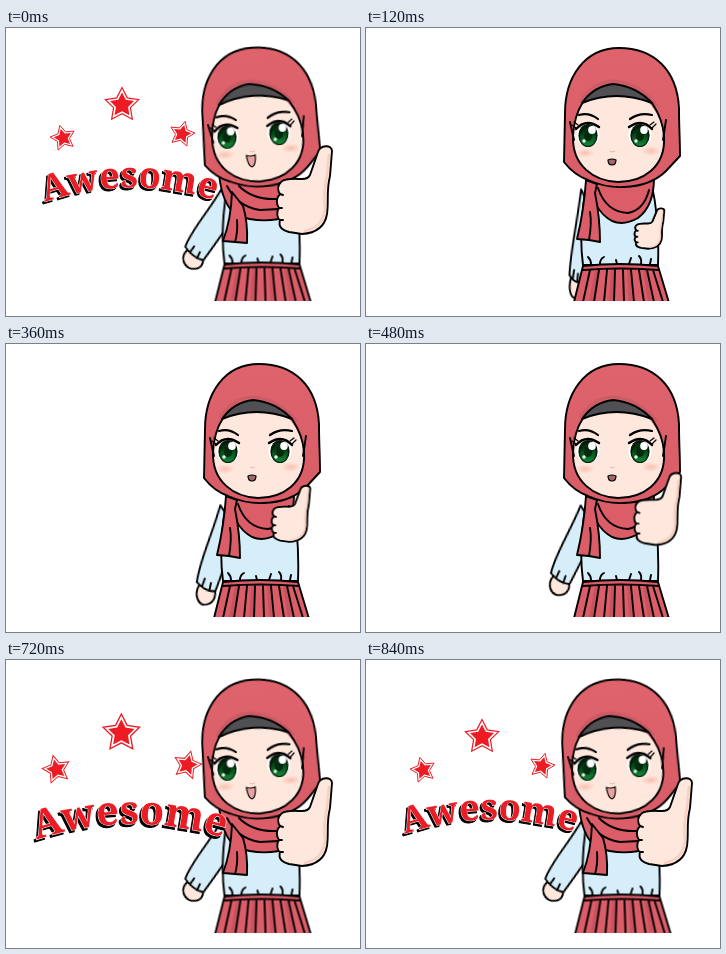
An HTML page that plays this animation: 354 px wide and 288 px high, repeating every 960 ms.

```html
<!DOCTYPE html>
<html lang="en">
<head>
<meta charset="utf-8">
<title>Awesome</title>
<style>
  html, body { margin: 0; width: 100%; height: 100%; overflow: hidden; background: #fff; }
  svg { display: block; width: 100vw; height: 100vh; }
  .ink { stroke: #000; stroke-width: 1.9; stroke-linejoin: round; stroke-linecap: round; vector-effect: non-scaling-stroke; }
  .line { fill: none; }
  .red { fill: #da5d68; }
  .skin { fill: #fee8de; }
  .blue { fill: #d6eef9; }
  .word { font: bold 36px "Noto Serif", serif; text-anchor: middle; }

  /* every pose is held for one eighth of the loop */
  .calm, .proud, .head, .body, .arm, .thumb, .cheer { animation: .96s step-end infinite; }
  .calm { animation-name: calm; }
  .proud { animation-name: proud; }
  .head { animation-name: head; transform-origin: 254px 90px; }
  .body { animation-name: body; }
  .arm { animation-name: arm; }
  .thumb { animation-name: thumb; }
  .cheer { animation-name: cheer; transform-origin: 122.5px 115px; }

  @keyframes calm { 0%, 62.5%, 100% { visibility: hidden } 12.5% { visibility: visible } }
  @keyframes proud { 0%, 62.5%, 100% { visibility: visible } 12.5% { visibility: hidden } }
  @keyframes head {
    0%, 62.5%, 100% { transform: translate(-2.3px, -.5px) rotate(-4deg) }
    12.5% { transform: none }
  }
  @keyframes body {
    0%, 62.5%, 100% { transform: translate(1.5px, -1.5px) }
    12.5% { transform: none }
  }
  @keyframes arm {
    0%, 62.5%, 100% { transform: translate(217px, 168px) rotate(25.5deg) scale(1.1, .84) }
    12.5% { transform: translate(217px, 168px) rotate(5deg) scale(.6, 1.08) }
    25% { transform: translate(217px, 168px) rotate(8.5deg) scale(.8, 1.04) }
    37.5% { transform: translate(217px, 168px) rotate(12deg) }
    50% { transform: translate(217px, 168px) rotate(18deg) scale(1.05, .92) }
  }
  @keyframes thumb {
    0%, 62.5%, 100% { transform: none }
    12.5% { transform: matrix(.54, 0, 0, .46, 122.2, 126) }
    25% { transform: matrix(.62, 0, 0, .55, 99, 96) }
    37.5% { transform: matrix(.7, 0, 0, .64, 76, 66) }
    50% { transform: matrix(.85, 0, 0, .82, 38, 32) }
  }
  @keyframes cheer {
    0%, 87.5%, 100% { transform: none }
    62.5% { transform: scale(.9) }
    75% { transform: scale(1.1) }
  }
</style>
</head>
<body>
<svg viewBox="0 0 354 288">
  <defs>
    <linearGradient id="hood" x2="0" y2="1">
      <stop offset="0" stop-color="#de636c"/><stop offset="1" stop-color="#d95d67"/>
    </linearGradient>
    <linearGradient id="iris" x2="0" y2="1">
      <stop offset=".2" stop-color="#04300f"/><stop offset="1" stop-color="#108a35"/>
    </linearGradient>
    <radialGradient id="blush">
      <stop offset="0" stop-color="#f9c0b0"/><stop offset="1" stop-color="#f9c0b0" stop-opacity="0"/>
    </radialGradient>
    <clipPath id="floor"><path d="M0 0H354V272.7H0Z"/></clipPath>
    <path id="arc" d="M36 175Q122 145 212 173"/>
    <path id="point" d="M0-100 30-41 95-31 48 15 59 81 0 50-59 81-48 15-95-31-30-41Z"/>
    <g id="star">
      <use href="#point" fill="#fff" stroke="#ed1c24" stroke-width="7"/>
      <use href="#point" fill="#ed1c24" transform="scale(.72)"/>
    </g>
    <g id="eye">
      <ellipse rx="11.5" ry="11.5" fill="#fff"/>
      <ellipse cy=".5" rx="9.6" ry="11.5" fill="#061c0b"/>
      <ellipse cy="2" rx="8" ry="9" fill="url(#iris)"/>
      <ellipse cy="1" rx="4" ry="5" fill="#032a0d"/>
      <ellipse cx="4" cy="-5" rx="3.8" ry="4" fill="#fff"/>
      <circle cx="-4" cy="6" r="1.7" fill="#e4f7e8"/>
    </g>
  </defs>

  <g clip-path="url(#floor)">
    <g class="arm">
      <path class="ink skin" d="M-8 76C-12 88-4 97 3 94 10 91 11 84 8 77Z"/>
      <path class="ink blue" d="M-4-6C-6 25-13 55-11 74Q0 82 9 79C12 60 14 40 18 15Z"/>
      <path class="ink line" d="M-5 77-4 69M3 80 3 72"/>
    </g>
    <g class="body">
      <path class="ink blue" d="M219 165C215 190 214 215 217 237H292C293 210 292 185 286 158Z"/>
      <path class="ink line" d="M225 236Q225 232 222 229M234 236Q234 231 238 229M251 236 250 232M263 236 265 230M275 236Q276 231 273 228M284 236 285 231"/>
      <path class="ink red" d="M217 238Q254 234 292 238L304 278H207Z"/>
      <path fill="#c9525f" d="M229 242 223 274H227L232 242ZM245 242 243 274H247L248 242ZM261 242 263 274H267L264 242ZM277 242 282 274H286L280 242Z"/>
      <path class="ink line" d="M217 242Q254 239 293 242M224 242 217 274M233 242 228 274M241 242 238 274M249 242 248 274M257 242 258 274M265 242 268 274M273 242 278 274M281 242 288 274M287 242 297 274"/>
    </g>
  </g>

  <g class="calm">
    <path class="ink red" d="M222 150Q226 182 246 193 258 198 272 190 288 178 288 150Z"/>
    <path class="ink line" d="M232 160Q240 184 262 185 278 182 283 162"/>
    <path class="ink red" d="M220 152Q218 182 211 211L223 212 234 214Q234 190 229 165L231 156Z"/>
    <path class="ink line" d="M223 212Q226 195 224 184"/>
  </g>
  <g class="proud">
    <path class="ink red" d="M213 146Q216 176 230 187 250 195 273 191L290 146Z"/>
    <path class="ink line" d="M221 158Q232 179 254 182L273 181M233 158Q247 172 270 171"/>
    <path class="ink red" d="M226 164Q225 192 217 213L229 214 241 215Q242 194 237 178Z"/>
    <path class="ink line" d="M229 214Q232 204 231 192"/>
  </g>

  <g class="head">
    <path class="ink" fill="url(#hood)" d="M253 20C218 20 199 50 199 85L198 134Q208 147 222 152 240 160 258 159 285 158 300 143L314 128C314 110 313 100 313 80 311 42 288 20 253 20Z"/>
    <path fill="none" stroke="#a9525a" stroke-opacity=".35" stroke-width="3" d="M214 74Q226 54 247 53 274 55 291 78"/>
    <path class="skin" d="M207 108C208 85 222 58 247 56 275 57 296 85 298 108 300 140 276 154 252 154 228 153 206 138 207 108Z"/>
    <path class="ink line" d="M207 108C206 138 228 153 252 154 276 154 300 140 298 108 297 94 292 84 286 75M217 74Q208 88 207 108"/>
    <path class="ink" fill="#505054" d="M216 75Q228 58 247 56 270 58 286 75 250 61 216 75Z"/>
    <path class="ink line" d="M204 94 208 112M300 92 297 112"/>
    <ellipse cx="219" cy="125" rx="10" ry="5" fill="url(#blush)"/>
    <ellipse cx="285" cy="123" rx="10" ry="5" fill="url(#blush)"/>
    <use href="#eye" x="222" y="107"/>
    <use href="#eye" x="274" y="107"/>
    <path class="ink line" style="stroke-width:2.4" d="M210 101Q220 90 233 99M263 99Q276 90 286 101"/>
    <path class="ink line" style="stroke-width:1.2" d="M210 100 206 97M212 97 208 94M286 100 290 96M284 97 288 94"/>
    <path class="ink line" style="stroke-width:2.2" d="M213 87Q223 84 232 91M264 91Q274 84 286 87"/>
    <path class="line" stroke="#e5b4a4" d="M244 123Q247 125 249 123"/>
    <path class="ink calm" style="stroke-width:1.2" fill="#a5656a" d="M242 132Q246 130 250 132 250 137 246 137 242 137 242 132Z"/>
    <path class="ink proud" style="stroke-width:1.2" fill="#eaa3a4" d="M240 127Q244 129 249 127 249 138 245 139 241 138 240 127Z"/>
  </g>

  <g class="thumb">
    <path class="ink skin" d="M326 123C326 116 314 117 312 124L304 147Q302 151 296 151C287 151 279 150 275 154 271 158 272 163 274 166 270 170 270 176 273 180 270 184 271 190 274 192 272 199 276 202 283 204L296 206C311 205 319 198 321 186 323 172 320 164 324 148Z"/>
    <path fill="none" stroke="#f9cfc0" stroke-width="2.5" d="M323 126 321 148Q317 164 319 180 317 200 298 203"/>
    <path class="ink line" d="M274 166 277 167M273 180 276 180M274 192 277 192"/>
  </g>

  <g class="proud">
    <g class="cheer">
      <use href="#star" transform="translate(116 77) scale(.175)"/>
      <use href="#star" transform="translate(57 110) rotate(-14) scale(.13)"/>
      <use href="#star" transform="translate(176 106) rotate(14) scale(.13)"/>
      <text class="word" stroke="#000" transform="translate(-1.8 2.2)"><textPath href="#arc" startOffset="50%">Awesome</textPath></text>
      <text class="word" fill="#ed1c24" stroke="#fff" paint-order="stroke"><textPath href="#arc" startOffset="50%">Awesome</textPath></text>
    </g>
  </g>
</svg>
</body>
</html>
```
